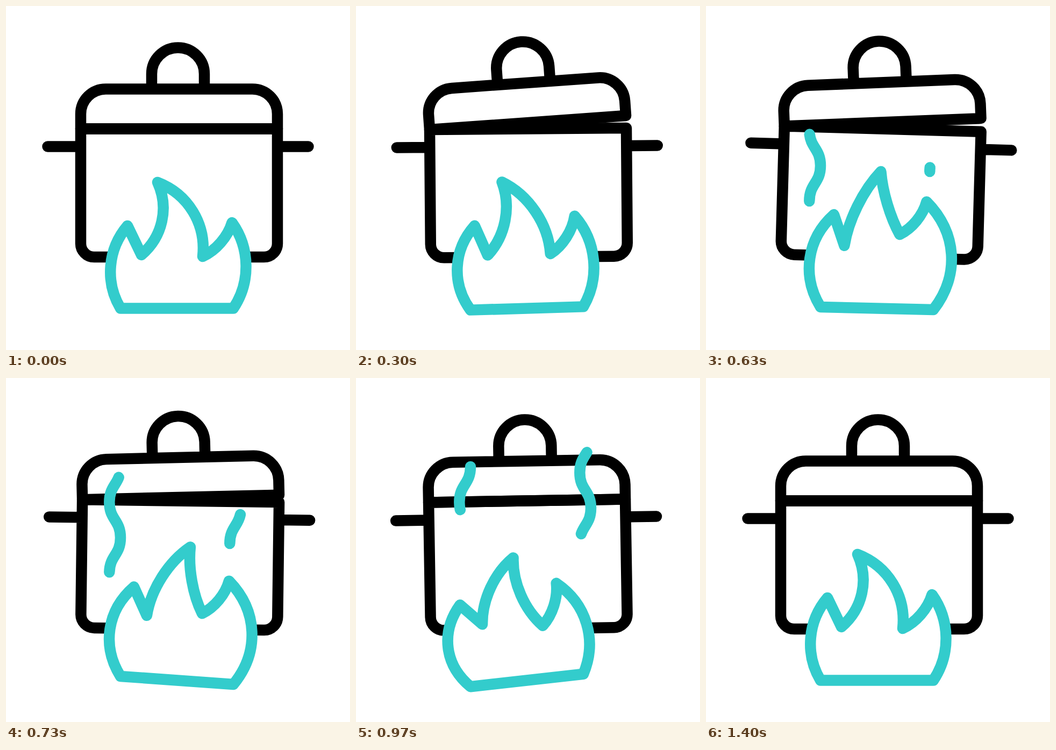
Recreate the animation shown at these times as an HTML page. Size 640 by 640 pixels, loop 1.67 s.

```html
<!DOCTYPE html>
<html lang="en">
<head>
<meta charset="utf-8">
<title>Boiling pot</title>
<style>
  html, body { margin: 0; height: 100%; overflow: hidden; background: #fff; }
  svg { display: block; width: 100vw; height: 100vh; }
  path { fill: none; stroke: #000; stroke-width: 20.5; stroke-linecap: round; stroke-linejoin: round; }
  .hot { stroke: #33cccc; }
  #flame { fill: #fff; }
</style>
</head>
<body>
<svg viewBox="0 0 640 640">
  <g id="pot">
    <path d="M139 228.5H505V442a25 25 0 0 1-25 25H164a25 25 0 0 1-25-25ZM77.5 261.5H139M505 261.5H562.5"/>
    <g id="lid">
      <path d="M139 228.5V201a46.5 46.5 0 0 1 46.5-46.5H458.5A46.5 46.5 0 0 1 505 201V228.5ZM271 154V126.5a49 49 0 0 1 98 0V154"/>
    </g>
  </g>
  <path id="steamLeft" class="hot" pathLength="100" d="M192.3 363c0-33 20.7-33 20.7-66s-20.7-33-20.7-66s20.7-33 20.7-66"/>
  <path id="steamRight" class="hot" pathLength="100" d="M416.3 308c0-33 20.7-33 20.7-66s-20.7-33-20.7-66s20.7-33 20.7-66"/>
  <path id="flame" class="hot"/>
</svg>
<script>
const LOOP = 1670;
const $ = id => document.getElementById(id);

const progress = (t, from, to) => Math.min(1, Math.max(0, (t - from) / (to - from)));
const pulse = (t, from, peak, to) => Math.min(progress(t, from, peak), 1 - progress(t, peak, to));
const mix = (a, b, p) => Array.isArray(a) ? a.map((v, i) => mix(v, b[i], p)) : a + (b - a) * p;

// Pose: tilt of the base; right tip, right valley, middle tip, left valley, left tip;
// bends of the right side, both middle edges and the left side.
const rest = [0, [[420.5, 403], [366, 466], [282, 328], [252, 463], [226, 409]], [0.207, 0.23, -0.226, 0.215]];
const bendLeft = [16, [[350, 340], [344, 440], [228, 325], [216, 466], [199, 408]], [0.242, -0.065, -0.026, 0.35]];
const upright = [-1, [[409, 360], [359, 421], [320, 306], [256, 447], [238, 388]], [0.264, -0.057, 0.082, 0.248]];
const leanRight = [-11, [[418, 387], [368, 447], [355, 319], [265, 439], [238, 389]], [0.269, -0.103, 0.154, 0.262]];
const leanLeft = [15.6, [[365, 381], [344, 463], [282, 337], [230, 461.5], [186, 428]], [0.241, -0.149, 0.143, 0.282]];
const flameKeys = [[0, rest], [277, rest], [400, bendLeft], [600, upright], [800, leanRight], [1000, leanLeft], [1400, rest], [LOOP, rest]];

function flamePose(t) {
  const next = flameKeys.findIndex(([time]) => time > t);
  const [from, a] = flameKeys[next - 1], [to, b] = flameKeys[next];
  return mix(a, b, progress(t, from, to));
}

// Curve from a to b, pushed sideways by a fraction of its length.
function edge([ax, ay], [bx, by], bend) {
  const dx = bx - ax, dy = by - ay;
  const control = f => `${ax + f * dx - bend * dy} ${ay + f * dy + bend * dx}`;
  return `C${control(0.3)} ${control(0.7)} ${bx} ${by}`;
}

function drawFlame([tilt, tips, [right, midRight, midLeft, left]]) {
  const points = [[423, 562.5 - tilt], ...tips, [213, 562.5 + tilt]];
  const bends = [right, -0.135, midRight, midLeft, 0, left];
  const edges = bends.map((bend, i) => edge(points[i], points[i + 1], bend));
  $('flame').setAttribute('d', `M${points[0]}${edges.join('')}Z`);
}

function drawSteam(id, tail, head) {
  const { style } = $(id);
  style.display = head > 0 && tail < 1 ? '' : 'none';
  style.strokeDasharray = `${Math.max(0.01, (head - tail) * 100)} 300`;
  style.strokeDashoffset = -tail * 100;
}

function draw(t) {
  const rock = 1.75 * pulse(t, 420, 650, 790) - 2.5 * pulse(t, 100, 200, 325) - 1.4 * pulse(t, 790, 900, 1120);
  const lift = 4 * pulse(t, 100, 290, 400) + 4.2 * pulse(t, 414, 650, 810);
  $('pot').setAttribute('transform', `rotate(${rock} 320 469)`);
  $('lid').setAttribute('transform', `rotate(${-lift} 139 228.5)`);
  drawSteam('steamLeft', progress(t, 728, 1133), progress(t, 400, 766));
  drawSteam('steamRight', progress(t, 936, 1342), progress(t, 617, 1029));
  drawFlame(flamePose(t));
}

const start = performance.now();
function tick() {
  draw((performance.now() - start) % LOOP);
  requestAnimationFrame(tick);
}
tick();
</script>
</body>
</html>
```
